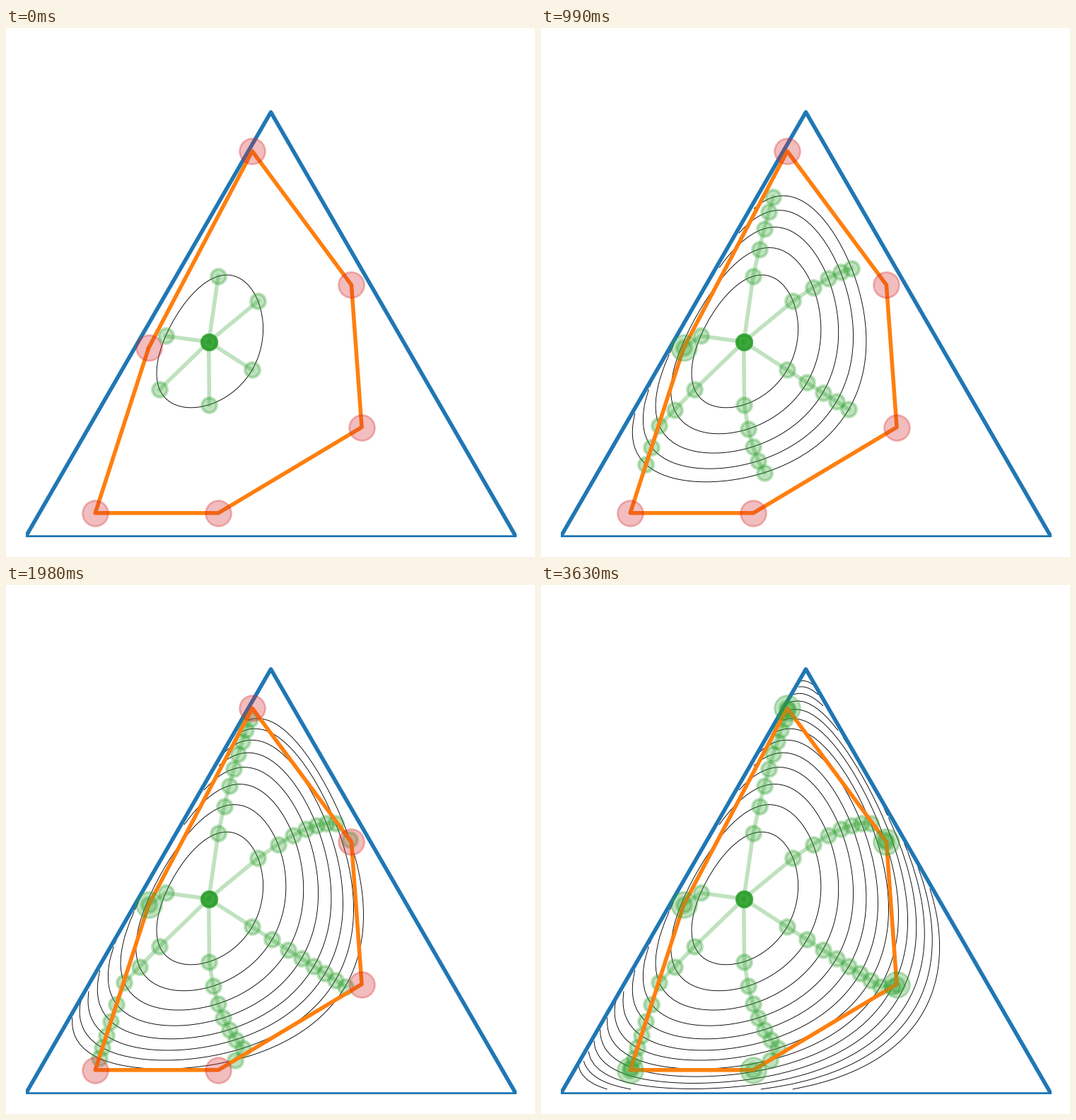
Write a matplotlib script that moves like this. It is 748x748 px and loops after 3.96 s.

```python
import numpy as np
import matplotlib.pyplot as plt
from matplotlib.animation import FuncAnimation

SIZE, SIDE = 748, 694
LEFT, BOTTOM = 27.5, 28
BLUE, ORANGE, GREEN, RED = "#1f77b4", "#ff7f0e", "#2ca02c", "#d62728"
STEP = 0.05
COUNTS = [1, 3, 4, 5, 6, 7, 8, 8, 10, 11, 12, 13]  # rings shown per frame

TRI = np.array([[0, 0], [0.5, np.sqrt(3) / 2], [1, 0]])


def to_data(px, py):
    return np.array([(px - LEFT) / SIDE, (SIZE - BOTTOM - py) / SIDE])


def weights(xy):
    """Barycentric weights (left, top, right) of points in the triangle."""
    x, y = np.moveaxis(np.asarray(xy), -1, 0)
    top = y / TRI[1, 1]
    right = x - top / 2
    return np.stack([1 - top - right, top, right], axis=-1)


CENTER = to_data(286.7, 443.8)
P = weights(CENTER)


def divergence(q):
    return np.sum(q * np.log(q / P), axis=-1)


CORNERS = np.array([to_data(*c) for c in [
    (201.7, 452.3), (348.2, 174.2), (488.4, 363.3),
    (503, 564.5), (300.3, 685.8), (126.2, 685.8)]])
ANGLES = np.radians([156.5, 106.5, 21.6, -30.3, -72.3, 203.3])


def inside(pt):
    edges = np.roll(CORNERS, -1, axis=0) - CORNERS
    rel = pt - CORNERS
    return np.all(edges[:, 0] * rel[:, 1] - edges[:, 1] * rel[:, 0] <= 0)


def ring_point(aim, radius):
    """Point of the ring that lies furthest along aim."""
    def tilt(s):
        q = P * np.exp(s * (TRI @ aim))
        return q / q.sum()

    lo, hi = 0.0, 60.0
    for _ in range(50):
        mid = (lo + hi) / 2
        if divergence(tilt(mid)) < radius:
            lo = mid
        else:
            hi = mid
    return tilt(lo) @ TRI


def edge_point(i, aim, radius):
    """Best point within the ring on the two edges that meet at corner i."""
    t = np.linspace(0, 1, 2001)[:, None]
    found = []
    for j in (i - 1, (i + 1) % len(CORNERS)):
        line = CORNERS[i] + t * (CORNERS[j] - CORNERS[i])
        hit = divergence(weights(line)) <= radius
        if hit.any():
            found.append(line[hit.argmax()])
    return max(found, key=lambda pt: pt @ aim)


def make_path(i):
    aim = np.array([np.cos(ANGLES[i]), np.sin(ANGLES[i])])
    reach = divergence(weights(CORNERS[i]))
    path, radius = [CENTER], STEP
    while radius < reach:
        pt = ring_point(aim, radius)
        path.append(pt if inside(pt) else edge_point(i, aim, radius))
        radius += STEP
    return np.array(path + [CORNERS[i]])


paths = [make_path(i) for i in range(len(CORNERS))]

fig = plt.figure(figsize=(SIZE / 100, SIZE / 100), dpi=100, facecolor="white")
ax = fig.add_axes([LEFT / SIZE, BOTTOM / SIZE, SIDE / SIZE, SIDE / SIZE])
ax.axis("off")

# divergence on a square grid, blank outside the triangle
gx, gy = np.meshgrid(np.linspace(0, 1, 100), np.linspace(0, 1, 100))
grid = weights(np.stack([gx, gy], axis=-1))
grid[(grid <= 1e-9).any(axis=-1)] = np.nan
field = np.ma.masked_invalid(divergence(grid))
rings = [ax.contour(gx, gy, field, levels=[STEP * (k + 1)], colors="black",
                    linewidths=0.65, zorder=1) for k in range(max(COUNTS))]


def closed(pts, color, z):
    loop = np.vstack([pts, pts[:1]])
    ax.plot(*loop.T, color=color, lw=4, zorder=z)


closed(TRI, BLUE, 2)
trails = [ax.plot([], [], "o-", color=GREEN, alpha=0.3, lw=4, ms=15, mew=3,
                  zorder=3)[0] for _ in paths]
closed(CORNERS, ORANGE, 4)
marks = [ax.plot(*c, "o", color=RED, alpha=0.3, ms=26, mew=2, zorder=5)[0]
         for c in CORNERS]
ax.set_xlim(0, 1)
ax.set_ylim(0, 1)


def update(frame):
    n = COUNTS[frame]
    for k, ring in enumerate(rings):
        ring.set_visible(k < n)
    for path, trail, mark in zip(paths, trails, marks):
        trail.set_data(*path[:n + 1].T)
        mark.set_color(GREEN if n + 1 >= len(path) else RED)
    return rings + trails + marks


anim = FuncAnimation(fig, update, frames=len(COUNTS), interval=330,
                     repeat=True, repeat_delay=0, blit=False)
plt.show()
```
